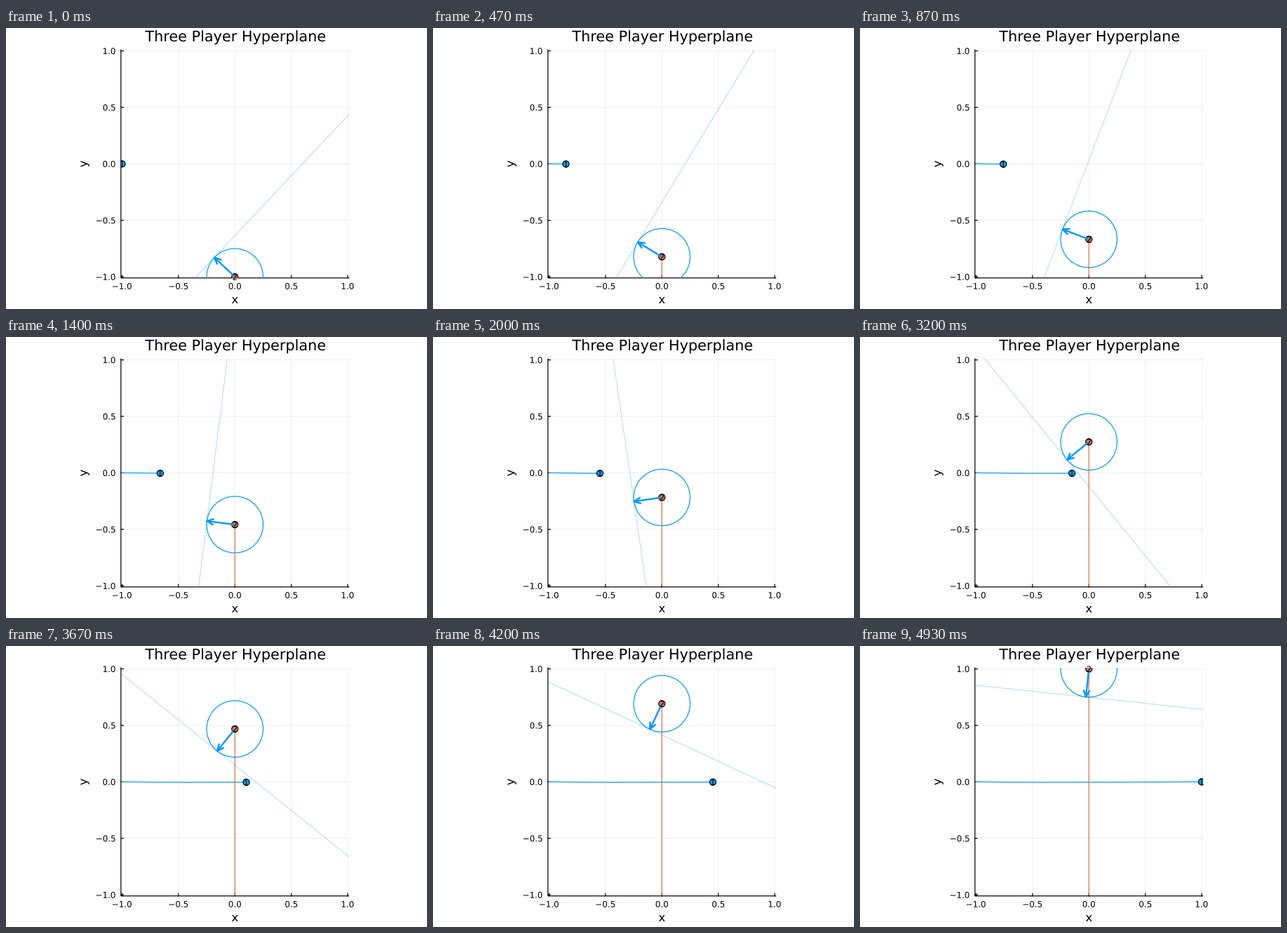
Write a matplotlib script that moves like this. It is 600 px wide and 400 px high and loops after 4.99 s.

```python
import numpy as np
import matplotlib.pyplot as plt
from matplotlib.animation import FuncAnimation
from matplotlib.patches import Circle, PathPatch, Rectangle
from matplotlib.textpath import TextPath
from matplotlib.transforms import Affine2D

plt.rcParams.update({"font.family": "DejaVu Sans", "toolbar": "None"})

W, H, DPI = 600, 400, 100
N, LOOP = 75, 4990
PT = 72 / DPI                      # points per pixel
CX, CY, UNIT, LIM = 326.2, 193.4, 160.8, 1.01
BLUE, ORANGE = "#009afa", "#e26f46"
RADIUS, SPIN = 0.25, 0.03
BARB, BARB_ANGLE = 10.8, np.radians(24)
TICK, GUIDE, TITLE = 11.9, 16.4, 20.8
DROP = 4.5                         # from a digit's middle to its baseline

fig = plt.figure(figsize=(W / DPI, H / DPI), dpi=DPI, facecolor="white")
ax = fig.add_axes([0, 0, 1, 1])
ax.set(xlim=(0, W), ylim=(H, 0))
ax.axis("off")


def px(x):
    return CX + UNIT * np.asarray(x)


def py(y):
    return CY - UNIT * np.asarray(y)


left, right, top, bottom = px(-LIM), px(LIM), py(LIM), py(-LIM)
frame = Rectangle((left, top), right - left, bottom - top,
                  transform=ax.transData)


def line(xs=(), ys=(), color="black", width=1.2, clip=False, **kw):
    art, = ax.plot(xs, ys, color=color, lw=width * PT, snap=False, **kw)
    if clip:
        art.set_clip_path(frame)
    return art


def place(art, x, y, turn=0):
    """Put a label's anchor on a pixel position."""
    flip = Affine2D().scale(1, -1).rotate_deg(-turn).translate(x, y)
    art.set_transform(flip + ax.transData)


def label(x, y, s, size, align=0.5, turn=0, zorder=3):
    """Outlined text on baseline y; align runs from 0 (left) to 1 (right)."""
    path = TextPath((0, 0), s, size=size)
    box = path.get_extents()
    path = path.transformed(
        Affine2D().translate(-box.x0 - align * box.width, 0))
    art = PathPatch(path, fc="black", lw=0, snap=False, zorder=zorder)
    ax.add_artist(art)
    place(art, x, y, turn)
    return art


def fit(ks, values, degree):
    """Smooth path through a few waypoints, with its ends held firmly."""
    weight = np.ones(len(ks))
    weight[[0, -1]] = 8
    coef = np.polyfit(np.array(ks) / (N - 1), values, degree, w=weight)
    return np.polyval(coef, np.linspace(0, 1, N))


# Axes, grid and text
for v in (-1, -0.5, 0, 0.5, 1):
    x, y = px(v), py(v)
    line([x, x], [top, bottom], width=0.6, alpha=0.1, zorder=1)
    line([left, right], [y, y], width=0.6, alpha=0.1, zorder=1)
    line([x, x], [bottom, bottom - 3.6], zorder=2)
    line([left, left + 3.6], [y, y], zorder=2)
    name = f"{v:.1f}".replace("-", "\u2212")
    label(x, 371.8, name, TICK)
    label(155.6, y + DROP, name, TICK, align=1)
line([left, left, right], [top, bottom, bottom], zorder=2,
     solid_joinstyle="miter")
label(326.6, 19, "Three Player Hyperplane", TITLE)
label(326.2, 392, "x", GUIDE)
label(115.4, 193.4, "y", GUIDE, turn=90)

# Player paths
steps = np.arange(N)
x1 = fit([0, 8, 13, 16, 24, 30, 42, 48, 63, 74],
         [-1, -0.833, -0.758, -0.721, -0.628, -0.547, -0.32, -0.15, 0.452, 1],
         5)
y1 = -0.004 * np.sin(np.pi * steps / (N - 1))
y2 = fit([0, 13, 30, 42, 48, 63, 74],
         [-1, -0.667, -0.218, 0.108, 0.275, 0.692, 1], 3)
paths = [(px(x1), py(y1)), (px(np.zeros(N)), py(y2))]
theta = 3 * np.pi / 4 + SPIN * (steps + 1)

trails, dots, tags = [], [], []
for i, color in enumerate((BLUE, ORANGE)):
    trails.append(line(color=color, clip=True, zorder=3))
    dot = Circle((0, 0), 4.6, fc=color, ec="black", lw=1.1 * PT, zorder=5)
    ax.add_patch(dot)
    dot.set_clip_path(frame)
    dots.append(dot)
    tags.append(label(0, 0, str(i + 1), TICK, zorder=8))

ring = Circle((0, 0), RADIUS * UNIT, fill=False, ec=BLUE, lw=1.2 * PT, zorder=4)
ax.add_patch(ring)
ring.set_clip_path(frame)
plane = line(color=BLUE, width=1.1, alpha=0.3, clip=True, zorder=4)
arrow = line(color=BLUE, width=2.4, clip=True, zorder=6,
             solid_joinstyle="round", solid_capstyle="butt")


def update(k):
    for (xs, ys), trail, dot, tag in zip(paths, trails, dots, tags):
        trail.set_data(xs[:k + 1], ys[:k + 1])
        dot.center = xs[k], ys[k]
        place(tag, xs[k], ys[k] + DROP)

    center = np.array([paths[1][0][k], paths[1][1][k]])
    a = theta[k]
    normal = np.array([np.cos(a), -np.sin(a)])
    along = np.array([np.sin(a), np.cos(a)])
    tip = center + RADIUS * UNIT * normal
    ring.center = center
    plane.set_data(*np.array([tip - 900 * along, tip + 900 * along]).T)

    barbs = [tip - BARB * (np.cos(BARB_ANGLE) * normal
                           + s * np.sin(BARB_ANGLE) * along) for s in (-1, 1)]
    gap = [np.nan, np.nan]
    arrow.set_data(*np.array([center, tip, gap, barbs[0], tip, barbs[1]]).T)
    return [*trails, *dots, *tags, ring, plane, arrow]


anim = FuncAnimation(fig, update, frames=N, interval=LOOP / N,
                     init_func=lambda: update(0), repeat=True, repeat_delay=0)
plt.show()
```
